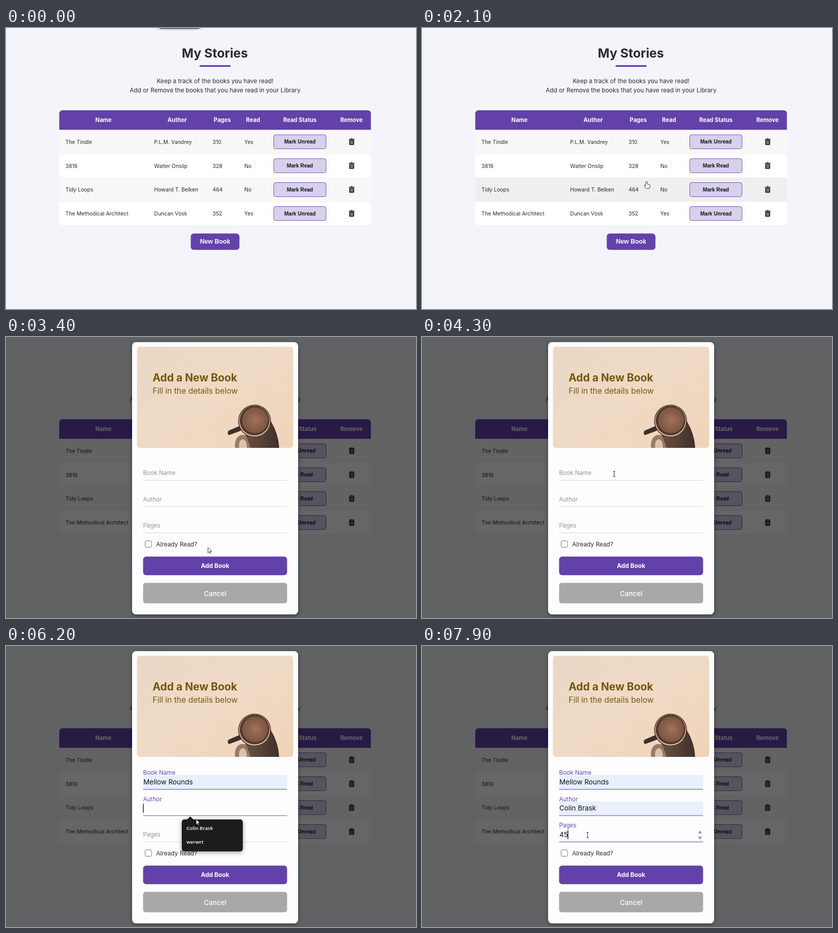
An HTML page that plays this animation: 800 px wide and 550 px high, repeating every 8 s.

```html
<!DOCTYPE html>
<html lang="en">
<head>
<meta charset="utf-8">
<title>Book list</title>
<style>
html, body { margin: 0; width: 100%; height: 100%; overflow: hidden; background: #f4f5fb }
svg { display: block; font-family: Inter, "Open Sans", sans-serif; fill: #2b2b2e }
.mid { text-anchor: middle }
.bold { font-weight: 700 }
.ui { font-family: "Liberation Sans", Arial, sans-serif; font-weight: 700 }
.menu { font: 600 9.6px "Open Sans", "Noto Sans", sans-serif; fill: #fff }
</style>
</head>
<body>
<svg id="stage" width="800" height="550" viewBox="0 0 800 550"></svg>
<script>
const LOOP = 8000, OPEN = 3400, PURPLE = '#6341aa', ACTIVE = '#6844c4';
const books = [
  ['The Tindle', 'P.L.M. Vandrey', 310, true],
  ['3816', 'Walter Onslip', 328, false],
  ['Tidy Loops', 'Howard T. Belken', 464, false],
  ['The Methodical Architect', 'Duncan Vosk', 352, true]
];
const fields = [
  { name: 'Book Name', y: 266.5, focus: 4420, pick: 5150, entry: 'Mellow Rounds', other: 'adfert' },
  { name: 'Author', y: 318, focus: 5800, pick: 6750, entry: 'Colin Brask', other: 'werwrt' },
  { name: 'Pages', y: 369.5, focus: 7250, keys: [7550, 7800], entry: '45' }
];
// time, x, y of the pointer
const path = [
  [0, 350, -25], [150, 350, -25], [500, 380, 240], [850, 402, 416], [1250, 390, 4],
  [1700, 415, 416], [1850, 420, 416], [2100, 438, 300], [2450, 425, 48], [3000, 394, 412],
  [3700, 394, 412], [4200, 375, 268], [4450, 375, 268], [4900, 382, 292], [5200, 382, 300],
  [5700, 365, 318], [5950, 365, 318], [6200, 371, 339], [6500, 380, 357], [6800, 380, 357],
  [7200, 323, 370], [8000, 323, 370]
];
const shapes = {
  arrow: 'M0 0V10.5L2.4 8.2L4 11.8L5.7 11L4.1 7.6H7.2Z',
  hand: 'M-1.5 1Q0-1 1.5 1V5.5L5 6.3Q7 7 7 9L6 14H-.5L-4.5 9.3Q-4.5 7-2.8 7.8L-1.5 9Z',
  beam: 'M-2-5H2M0-5V5M-2 5H2'
};

const text = (x, y, size, str, attrs = '') => `<text x="${x}" y="${y}" font-size="${size}" ${attrs}>${str}</text>`;
const rect = (x, y, w, h, fill, r = 0, attrs = '') =>
  `<rect x="${x}" y="${y}" width="${w}" height="${h}" fill="${fill}" rx="${r}" ${attrs}/>`;
const rowTop = i => 199.5 + 46.8 * i;

function bookRow([name, author, pages, read], i) {
  const top = rowTop(i), base = top + 27.2;
  return rect(104, top, 608, 46.8, i % 2 ? '#fff' : '#f8f8f9', 0, 'class="row"') +
    rect(104, top + 46.3, 608, .8, '#e9e9ee') +
    text(116, base, 10.35, name) + text(289, base, 10.35, author) +
    text(403, base, 10.35, pages) + text(465, base, 10.35, read ? 'Yes' : 'No') +
    rect(522.5, top + 9.5, 102, 27.5, '#d9d0eb', 4, 'stroke="#7355bd"') +
    text(573.5, top + 26.6, 10.1, read ? 'Mark Unread' : 'Mark Read', 'class="ui mid" fill="#101020"') +
    `<g transform="translate(674.5 ${top + 16.5})"><path d="M-5.5 1.3H-2.2L-1.5 0H1.5L2.2 1.3H5.5V3H-5.5Z
      M-4.8 3.6H4.8V11.6Q4.8 13 3.4 13H-3.4Q-4.8 13-4.8 11.6Z"/>
      <path d="M-1.4 5.5V11M1.4 5.5V11" stroke="#f4f4f6" stroke-width="1.1"/></g>`;
}

const page = rect(0, 0, 800, 550, '#f4f5fb') +
  text(407.5, 57.5, 24.6, 'My Stories', 'class="bold mid"') +
  rect(377.5, 72.7, 61, 3.3, PURPLE, 1.6) +
  text(408, 107.7, 11.75, 'Keep a track of the books you have read!', 'class="mid"') +
  text(408, 126, 11.75, 'Add or Remove the books that you have read in your Library', 'class="mid"') +
  '<g clip-path="url(#table)">' + rect(104, 161, 608, 38.5, PURPLE) +
  [['Name', 190], ['Author', 334], ['Pages', 422], ['Read', 482], ['Read Status', 573.5], ['Remove', 674]]
    .map(([s, x]) => text(x, 184, 11.1, s, 'class="bold mid" fill="#fff"')).join('') +
  books.map(bookRow).join('') + '</g>' +
  '<g id="newBook">' + rect(360.5, 402.3, 95, 32, PURPLE, 6) +
  text(408, 422.4, 12.2, 'New Book', 'class="ui mid" fill="#fff"') + '</g>' +
  '<g id="tip">' + rect(299, -8, 79, 9, '#222', 2, 'filter="url(#shadow)"') + '</g>';

const photo = '<g clip-path="url(#photo)">' + rect(255, 19, 306, 198, 'url(#wall)') +
  `<path d="M447 217Q445 197 458 192Q470 190 476 200L480 217Z" fill="#9a7a63"/>
  <path d="M455 217Q453 202 462 200Q470 202 470 217Z" fill="#dfc3aa"/>
  <path d="M456 174L435 183Q430 187 435 192L462 182Z" fill="#3d302c"/>
  <path d="M454 172Q468 186 477 217H533Q532 190 516 163Z" fill="url(#mug)"/>
  <circle cx="485" cy="164.5" r="32" fill="#4f3d36"/>
  <circle cx="485" cy="164.5" r="30.3" fill="#d9c0a9"/>
  <circle cx="485" cy="163.5" r="29" fill="#50352a"/>
  <circle cx="486" cy="163" r="25.5" fill="url(#coffee)"/>` + '</g>';

const fieldMarkup = f => '<g class="field">' +
  rect(267.5, f.y - 13.5, 281, 27.5, '#e8f0fe', 0, 'class="fill"') +
  `<path class="line" d="M267.5 ${f.y + 14}H548.5" stroke-width="1.2"/>` +
  `<text class="label" x="267.5" font-size="11.6">${f.name}</text>` +
  `<text class="value" x="268" y="${f.y + 4.4}" fill="#101014"></text></g>`;

const modal = rect(0, 0, 800, 550, '#000', 0, 'opacity=".6"') +
  rect(246, 10, 324, 533, '#fdfdfe', 8, 'filter="url(#shadow)"') + photo +
  text(286, 86.5, 20.8, 'Add a New Book', 'class="bold" fill="#76560c"') +
  text(286, 111.2, 15.5, 'Fill in the details below', 'fill="#76560c"') +
  fields.map(fieldMarkup).join('') +
  '<path id="spin" d="M539 366.5L542.5 361.5L546 366.5ZM539 373.5L542.5 378.5L546 373.5Z" fill="#858585"/>' +
  rect(271.5, 399, 12.5, 12.5, '#fff', 2, 'stroke="#767676"') +
  text(293, 409.5, 11.75, 'Already Read?') +
  rect(267.5, 429.7, 281, 36.5, PURPLE, 6) +
  text(408, 452.3, 11.8, 'Add Book', 'class="bold mid" fill="#fff"') +
  rect(267.5, 481.3, 281, 40, '#a8a8a8', 5) +
  text(408, 506.7, 13.3, 'Cancel', 'class="mid" font-weight="500" fill="#fff"') +
  '<rect id="caret" width="1.3" height="17.5" fill="#000"/>' +
  '<g id="menu"><path d="M353 6.5L359.5 0L366 6.5Z" fill="#1f1f1f"/>' +
  rect(343, 6, 119, 62.5, '#1f1f1f', 5, 'filter="url(#shadow)"') +
  '<g id="hot">' + rect(343, 8.5, 119, 28, '#3b3b3b') +
  '<path d="M442.5 19L449 25.5M449 19L442.5 25.5" stroke="#ddd" stroke-width="1.2"/></g>' +
  '<text id="first" class="menu" x="352" y="26"/><text id="second" class="menu" x="352" y="53.3"/></g>';

const stage = document.getElementById('stage');
stage.innerHTML = `<defs>
  <clipPath id="table">${rect(104, 161, 608, 225.7, '#000', 6)}</clipPath>
  <clipPath id="photo">${rect(255.5, 19, 305, 198, '#000', 6)}</clipPath>
  <linearGradient id="wall" x2="1" y2="1"><stop stop-color="#e9d8c6"/><stop offset=".5" stop-color="#efdac5"/>
    <stop offset="1" stop-color="#f0d3b8"/></linearGradient>
  <linearGradient id="mug"><stop stop-color="#6f5545"/><stop offset=".5" stop-color="#594439"/>
    <stop offset="1" stop-color="#3e302b"/></linearGradient>
  <radialGradient id="coffee"><stop stop-color="#a0745a"/><stop offset="1" stop-color="#7d5340"/></radialGradient>
  <filter id="shadow" x="-20%" y="-20%" width="140%" height="150%">
    <feDropShadow dx="0" dy="2" stdDeviation="4" flood-opacity=".4"/></filter>
  </defs>${page}<g id="modal">${modal}</g>
  <path id="pointer" stroke="#222" stroke-linejoin="round"/>`;

const $ = id => document.getElementById(id);
const set = (el, attrs) => Object.entries(attrs).forEach(([k, v]) => el.setAttribute(k, v));
const show = (el, on) => set(el, { visibility: on ? 'inherit' : 'hidden' });
const rows = [...stage.querySelectorAll('.row')];
stage.querySelectorAll('.field').forEach((group, i) => {
  for (const part of ['fill', 'line', 'label', 'value']) fields[i][part] = group.querySelector('.' + part);
});
const smooth = p => p * p * (3 - 2 * p);
const clamp = p => Math.max(0, Math.min(1, p));

function pointerAt(t) {
  const i = path.findIndex(k => k[0] > t);
  const [t0, x0, y0] = path[i - 1], [t1, x1, y1] = path[i];
  const p = smooth((t - t0) / (t1 - t0));
  return [x0 + (x1 - x0) * p, y0 + (y1 - y0) * p];
}

function drawField(f, t, preview) {
  const on = t >= f.focus;
  const typed = f.keys ? f.keys.filter(k => t >= k).length : t >= f.pick || preview ? f.entry.length : 0;
  f.value.textContent = f.entry.slice(0, typed);
  set(f.value, {
    'font-size': preview ? 10.1 : 13.4,
    'font-family': preview ? 'Liberation Sans, Arial, sans-serif' : 'Inter, sans-serif'
  });
  show(f.fill, !f.keys && typed);
  set(f.line, { stroke: on ? ACTIVE : '#dcdce0' });
  set(f.label, {
    y: f.y + 3.9 - 18.3 * smooth(clamp((t - f.focus) / 200)),
    fill: on ? ACTIVE : '#90959f'
  });
}

// Returns whether the pointer is over the suggestion menu.
function drawForm(t, y) {
  const current = fields.filter(f => t >= f.focus).pop();
  const menuOpen = t < current?.pick;
  const hot = menuOpen && y >= current.y + 23;
  fields.forEach(f => drawField(f, t, f === current && hot));
  show($('menu'), menuOpen);
  show($('hot'), hot);
  show($('spin'), current?.keys);
  show($('caret'), false);
  if (!current) return false;

  const edits = [current.focus, ...(current.keys || [current.pick])];
  const lastEdit = Math.max(...edits.filter(k => k <= t));
  show($('caret'), (t - lastEdit) % 1000 < 500);
  const end = menuOpen ? 0 : current.value.getComputedTextLength();
  set($('caret'), { x: 267.4 + end, y: current.y - 9 });
  if (menuOpen) {
    set($('menu'), { transform: `translate(0 ${current.y + 15.5})` });
    $('first').textContent = current.entry;
    $('second').textContent = current.other;
  }
  return menuOpen && y >= current.y + 16;
}

function draw(t) {
  const [x, y] = pointerAt(t), open = t >= OPEN;
  const overButton = !open && y > 402 && y < 434;
  const row = open ? -1 : Math.floor((y - rowTop(0)) / 46.8);
  rows.forEach((r, i) => set(r, { fill: i === row ? '#efefef' : i % 2 ? '#fff' : '#f8f8f9' }));
  set($('newBook'), { transform: `translate(0 ${overButton ? -1.2 : 0})` });
  show($('tip'), t < 100);
  show($('modal'), open);
  let kind = overButton || rows[row] ? 'hand' : 'arrow';
  if (open) {
    const overMenu = drawForm(t, y);
    if (!overMenu && fields.some(f => Math.abs(y - f.y) < 14)) kind = 'beam';
  }
  set($('pointer'), {
    d: shapes[kind],
    transform: `translate(${x} ${y})`,
    fill: kind === 'beam' ? 'none' : '#fff',
    'stroke-width': kind === 'beam' ? 1 : .9
  });
}

const start = performance.now();
function tick() {
  draw((performance.now() - start) % LOOP);
  requestAnimationFrame(tick);
}
tick();
</script>
</body>
</html>
```
